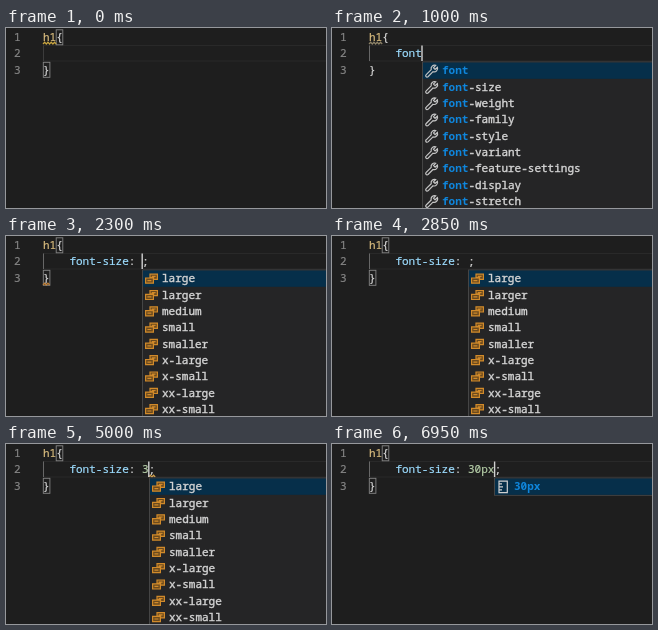
An HTML page for the animation above (7000 ms loop, 320 by 180 pixels).

```html
<!DOCTYPE html>
<html lang="en">
<head>
<meta charset="utf-8">
<title>CSS autocomplete</title>
<style>
html, body { margin: 0; height: 100%; overflow: hidden; background: #1e1e1e; }
svg { display: block; width: 100vw; height: 100vh; }
text { font: 11px "Noto Sans Mono", "DejaVu Sans Mono", monospace; white-space: pre; stroke-width: .2; }
text, tspan { fill: currentColor; stroke: currentColor; }
.popup text { stroke-width: .4; }
.popup .hit { color: #0f86dc; font-weight: 700; stroke-width: 0; }
path, .line { fill: none; }
</style>
</head>
<body>
<svg id="stage" viewBox="0 0 320 180"></svg>
<script>
const LOOP = 7000, CHAR = 6.6, LEFT = 37, ROW = 16.3;
const stage = document.getElementById('stage');

const props = ['font', ...['size', 'weight', 'family', 'style', 'variant',
  'feature-settings', 'display', 'stretch'].map(s => 'font-' + s)];
const sizes = ['large', 'larger', 'medium', 'small', 'smaller',
  'x-large', 'x-small', 'xx-large', 'xx-small'];

const icons = {
  wrench: `<path stroke="#c5c5c5" stroke-width="1.2" d="M1.2 10.2l5-5a3.5 3.5 0 0 1 4.5-4.2
    l-2.2 2.4 1.6 1.6 2.3-2.2a3.5 3.5 0 0 1-4.4 4.5l-5 5a1.3 1.3 0 0 1-1.8-2.1z"/>`,
  value: `<path stroke="#d18a2a" stroke-width="1.2" style="fill:#6b4a1e" d="M5 5.2V1.8H12.4V7H8.6V5.2z
    M.6 5.6H8.4V10.8H.6zM6.8 4H10.6M2.4 8.2H6.4"/>`,
  unit: `<path stroke="#d0d0d0" stroke-width="1.2" d="M2 .8H10.3V12.2H2z
    M2 3.5H5M2 6.5H6M2 9.5H5"/>`
};

// Each key press: time, text before the caret, text after it, popup items, icon, matched letters
const steps = [
  [0, '', ''],
  [550, 'f', '', props, 'wrench', 1],
  [650, 'fo', '', props, 'wrench', 2],
  [700, 'fon', '', props, 'wrench', 3],
  [800, 'font', '', props, 'wrench', 4],
  [2300, 'font-size: ', ';', sizes, 'value', 0],
  [5000, 'font-size: 3', ';', sizes, 'value', 0],
  [5100, 'font-size: 3', ';'],
  [5150, 'font-size: 30', ';'],
  [5650, 'font-size: 30p', ';', ['30px', '30pt', '30pc'], 'unit', 3],
  [5950, 'font-size: 30px', ';', ['30px'], 'unit', 4]
];

const col = n => LEFT + n * CHAR;
const span = (s, color) => `<tspan color="${color}">${s}</tspan>`;
const text = (x, y, body, color = '#d4d4d4') => `<text x="${x}" y="${y}" color="${color}">${body}</text>`;
const rect = (x, y, w, h, fill) => `<rect x="${x}" y="${y}" width="${w}" height="${h}" fill="${fill}"/>`;
const box = (x, y) => `<rect class="line" x="${x}" y="${y}" width="6.6" height="15" stroke="#858585" stroke-width=".9"/>`;
const squiggle = (n, y, chars, color) =>
  `<path stroke="${color}" stroke-width="1.2" d="M${col(n)} ${y}${'l1.65-1.8 1.65 1.8'.repeat(2 * chars)}"/>`;

function popup(x, items, icon, hit, picked) {
  const height = items.length * ROW + 1;
  let out = rect(x, 33.5, 330, height, '#252526') +
    `<rect class="line" x="${x + .5}" y="34" width="330" height="${height}" stroke="#454545"/>` +
    rect(x + 1, 34.5 + picked * ROW, 330, ROW, '#062f4a');
  items.forEach((item, i) => {
    const y = 42.7 + i * ROW;
    out += `<g transform="translate(${x + 3} ${y - 6.3})">${icons[icon]}</g>` +
      text(x + 20, y + 3.7, `<tspan class="hit">${item.slice(0, hit)}</tspan>${item.slice(hit)}`);
  });
  return `<g class="popup">${out}</g>`;
}

function caretOn(t) {
  if (t < 550) return t >= 150;
  const from = [5950, 5650, 5150, 5000, 2300, 800, 550].find(s => t >= s);
  return Math.floor((t - from) / 500) % 2 === 0;
}

function draw(t) {
  const [, before, after, items, icon, hit] = steps.findLast(s => t >= s[0]);
  const caret = col(4 + before.length);
  const colon = before.indexOf(':') + 1;
  const name = colon ? before.slice(0, colon - 1) : before;
  const rest = colon ? span(':', '#d4d4d4') + span(before.slice(colon), '#b5cea8') : '';

  let out = rect(0, 0, 320, 180, '#1e1e1e') +
    rect(LEFT, 17, 283, 1, '#292929') + rect(LEFT, 32.5, 283, 1, '#292929') +
    rect(LEFT, 17.5, .9, 15.5, t < 550 ? '#404040' : '#707070');
  [13, 29.4, 45.8].forEach((y, i) => out += text(8, y, i + 1, '#858585'));

  if (t < 550 || t >= 2300) out += box(50.2, 1.8) + box(37.3, 34.3);
  out += text(LEFT, 13, span('h1', '#d7ba7d') + '{') +
    text(col(4), 29.4, span(name, '#9cdcfe') + rest + after) +
    text(LEFT, 45.8, '}');

  if (t < 2300) out += squiggle(0, 16, 2, t < 550 ? '#c9a53f' : '#8f8468');
  if (t >= 1300 && t < 2600) out += squiggle(0, 49, 1, '#c08038');
  if (t >= 2900 && t < 5100) out += squiggle(4 + before.length, 33, 1, '#cfa050');
  if (t >= 5250 && t < 6200) out += squiggle(15, 33, 1, '#a39a5c');

  if (items) out += popup(Math.round(caret), items, icon, hit, t >= 1750 && t < 2300 ? 1 : 0);
  if (caretOn(t)) out += rect(caret - .5, 17.5, 1.4, 15.5, '#d0d0d0');
  return out;
}

let shown = '';
const start = performance.now();
function tick() {
  const next = draw((performance.now() - start) % LOOP);
  if (next !== shown) stage.innerHTML = shown = next;
  requestAnimationFrame(tick);
}
tick();
</script>
</body>
</html>
```
